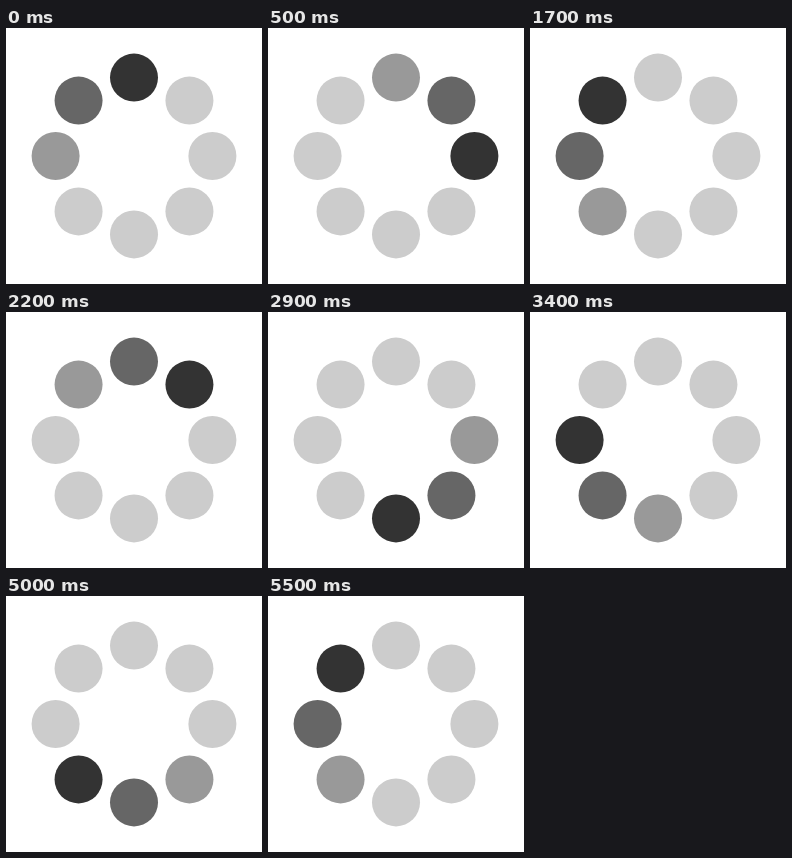
These frames come from a looping animation (256x256 px, 5.7 s). An HTML page with a canvas:

```html
<!DOCTYPE html>
<html lang="en">
<head>
<meta charset="utf-8">
<title>Loading ring</title>
<style>
  html, body { margin: 0; width: 100%; height: 100%; overflow: hidden; background: #fff; }
  canvas { display: block; width: 256px; height: 256px; }
</style>
</head>
<body>
<canvas id="stage" width="256" height="256"></canvas>
<script>
  const ctx = document.getElementById('stage').getContext('2d');
  const LOOP = 5700;
  const TICK = 100;
  const STEP = 240;
  const DOTS = 8;
  const CENTER = 128;
  const RING = 78.4;
  const RADIUS = 24;
  const TRAIL = ['#333', '#666', '#999'];
  const IDLE = '#ccc';

  // Each 240 ms step lands on the nearest 100 ms tick.
  function stepAt(ms) {
    const tick = Math.floor((ms % LOOP) / TICK);
    return Math.floor((tick + 0.5) * TICK / STEP);
  }

  function draw(step) {
    ctx.fillStyle = '#fff';
    ctx.fillRect(0, 0, 256, 256);
    const head = step % DOTS;
    for (let i = 0; i < DOTS; i++) {
      const angle = i * 2 * Math.PI / DOTS;
      const lag = (head - i + DOTS) % DOTS;
      ctx.fillStyle = TRAIL[lag] || IDLE;
      ctx.beginPath();
      ctx.arc(CENTER + RING * Math.sin(angle), CENTER - RING * Math.cos(angle), RADIUS, 0, 2 * Math.PI);
      ctx.fill();
    }
  }

  const start = performance.now();
  function frame() {
    draw(stepAt(performance.now() - start));
    requestAnimationFrame(frame);
  }
  frame();
</script>
</body>
</html>
```
